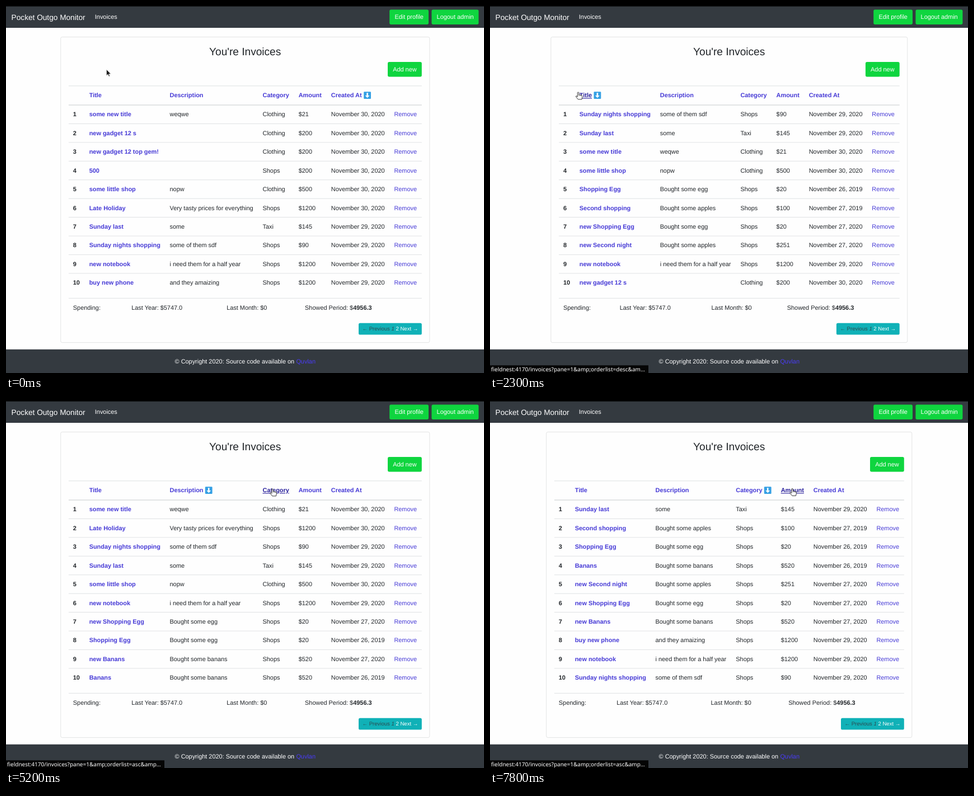
An HTML page that plays this animation: 854 by 656 pixels, repeating every 8000 ms.

```html
<!DOCTYPE html>
<html lang="en">
<head>
<meta charset="utf-8">
<title>Invoices</title>
<style>
  html, body { margin: 0; width: 100%; height: 100%; overflow: hidden; background: #fefefe; }
  svg { display: block; width: 854px; height: 656px; }
  text { font: 10.92px "Liberation Sans", Arial, sans-serif; fill: #212529; text-rendering: geometricPrecision; white-space: pre; }
  .b { font-weight: bold; }
  .link { fill: #463ad6; }
  .hover { fill: #29209c; text-decoration: underline; }
  .w { fill: #fff; }
  .brand { font-size: 13.66px; }
  .head { font-size: 19.1px; }
  .pager { font-size: 9.56px; }
  .bar { font: 10px "Noto Sans", "Open Sans", sans-serif; fill: #fff; }
</style>
</head>
<body>
<svg viewBox="0 0 854 656">
  <rect width="854" height="656" fill="#fefefe"/>
  <rect width="854" height="39" fill="#343a40"/>
  <rect width="854" height="1" fill="#0c0d0e"/>
  <rect y="613.8" width="854" height="43" fill="#343a40"/>
  <g id="fixed"></g>
  <g id="page"></g>
  <g id="status"></g>
  <g id="cursor"></g>
</svg>
<script>
const LOOP = 8000, TICK = 100, ROW = 33.44;
const el = id => document.getElementById(id);

// title | description | category | amount | date
const items = `some new title|weqwe|Clothing|21|30, 2020
new gadget 12 s||Clothing|200|30, 2020
new gadget 12 top gem!||Clothing|200|30, 2020
500||Shops|200|30, 2020
some little shop|nopw|Clothing|500|30, 2020
Late Holiday|Very tasty prices for everything|Shops|1200|30, 2020
Sunday last|some|Taxi|145|29, 2020
Sunday nights shopping|some of them sdf|Shops|90|29, 2020
new notebook|i need them for a half year|Shops|1200|29, 2020
buy new phone|and they amaizing|Shops|1200|29, 2020
Banans|Bought some banans|Shops|520|26, 2019
First shopping|Bought some apples|Shops|10|27, 2019
new Banans|Bought some banans|Shops|520|27, 2020
new Second night|Bought some apples|Shops|251|27, 2020
Shopping Egg|Bought some egg|Shops|20|26, 2019
Second shopping|Bought some apples|Shops|100|27, 2019
new Shopping Egg|Bought some egg|Shops|20|27, 2020`.split('\n').map(s => s.split('|'));

const heads = ['Title', 'Description', 'Category', 'Amount', 'Created At'];
const headWidth = [22.5, 60.1, 47.3, 41.2, 55.2];

// Sorted views: order spells out items by letter, a = first
const views = [
  { at: 0, left: 97.7, desc: 292.5, sort: 4, up: false, order: 'abcdefghij' },
  { at: 1400, left: 99.3, desc: 291, sort: 0, up: true, order: 'dkfjlmcbin' },
  { at: 2300, left: 108.8, desc: 303.8, sort: 0, up: false, order: 'hgaeopqnib' },
  { at: 3900, left: 121.8, desc: 313.5, sort: 1, up: true, order: 'dbcjlpnkmo' },
  { at: 4100, left: 97.7, desc: 292.5, sort: 1, up: false, order: 'afhgeiqomk' },
  { at: 5900, left: 112.3, desc: 307, sort: 2, up: true, order: 'eacbnqmjlh' },
  { at: 6900, left: 100.7, desc: 295.5, sort: 2, up: false, order: 'gpoknqmjih' }
];

const hovers = [
  { at: 0, col: -1 }, { at: 600, col: 0 }, { at: 2700, col: -1 }, { at: 3000, col: 1 },
  { at: 4600, col: -1 }, { at: 5100, col: 2 }, { at: 5900, col: -1 }, { at: 6400, col: 2 },
  { at: 7400, col: -1 }, { at: 7600, col: 3 }
];

const host = 'fieldnest:4170/';
const descUrl = host + 'invoices?pane=1&amp;orderlist=desc&am…';
const ascUrl = host + 'invoices?pane=1&amp;orderlist=asc&amp…';
const bars = [
  { at: 0, text: '' },
  { at: 700, text: host + '?orderlist=asc&pane=1&rank=title', width: 236 },
  { at: 2100, text: descUrl }, { at: 2800, text: '' }, { at: 3100, text: ascUrl },
  { at: 4100, text: descUrl }, { at: 5100, text: ascUrl },
  { at: 6400, text: descUrl }, { at: 7000, text: ascUrl }
];

// Pointer path: time, x, y
const path = [
  [100, 179.5, 113.5], [800, 158, 155], [900, 158, 155], [1000, 157.5, 154.5],
  [2500, 157.5, 154.5], [3100, 347, 152], [3300, 347, 152], [3400, 340, 158.5],
  [4400, 340, 158.5], [5200, 476, 157.5], [6000, 476, 157.5], [6200, 482, 159],
  [6500, 464, 158], [7100, 464, 158], [7800, 540, 157]
];

const current = (list, t) => list.filter(s => s.at <= t).pop();
const safe = s => s.replace(/&/g, '&amp;');
const text = (x, y, s, cls = '') => `<text x="${x}" y="${y}" class="${cls}">${safe(s)}</text>`;
const box = (x, y, w, h, fill) => `<rect x="${x}" y="${y}" width="${w}" height="${h}" rx="2.7" fill="${fill}"/>`;
const button = (x, y, w, s) => box(x, y, w, 26.4, '#0fd53f') + text(x + 9.2, y + 16.9, s, 'w');

function rule(x1, x2, y, w = 0.8) {
  return `<path d="M${x1} ${y}H${x2}" stroke="#d9dbdd" stroke-width="${w}"/>`;
}

function sortIcon(x, up) {
  const turn = up ? '' : ' rotate(180)';
  return `<g transform="translate(${x + 6.5} 159.6)${turn}">
    <rect x="-6.4" y="-6.4" width="12.8" height="12.8" rx="1.2" fill="#35a0e4"/>
    <path d="M0 -4.6L4 -.4H1.3V4.4H-1.3V-.4H-4Z" fill="#fff"/></g>`;
}

function drawFixed() {
  return text(9.6, 24.7, 'Pocket Outgo Monitor', 'w brand') +
    text(158.8, 23.4, 'Invoices', 'w') +
    button(685.2, 6.5, 69.8, 'Edit profile') +
    button(760.4, 6.5, 84, 'Logout admin') +
    text(301.6, 639.2, '© Copyright 2020: Source code available on', 'w') +
    '<text x="518.4" y="639.2" style="fill:#4a3cf6">Quvlan</text>';
}

function drawPage(v, hover) {
  const left = v.left, right = 854.5 - left, d = left - views[0].left;
  const removeX = right - 63.4, madeX = removeX - 112.6, amountX = madeX - 58.1;
  const catX = amountX - (v.sort === 2 ? 80.4 : 64.2);
  const cols = [left + 51, v.desc, catX, amountX, madeX];
  const x1 = left + 14.2, x2 = right - 14, numX = left + 22.1;

  let out = `<rect x="${left}" y="55.4" width="${right - left}" height="546.2" rx="2.7" fill="#fefefe" stroke="#dcddde" stroke-width=".8"/>`;
  out += '<text x="427.2" y="87.5" class="head" text-anchor="middle">You\'re Invoices</text>';
  out += button(x2 - 60.8, 100, 60.8, 'Add new');
  out += rule(x1, x2, 142.8) + rule(x1, x2, 177, 1.4);

  heads.forEach((h, i) => out += text(cols[i], 163.4, h, 'b link' + (i === hover ? ' hover' : '')));
  out += sortIcon(cols[v.sort] + headWidth[v.sort] + 3.1, v.up);

  [...v.order].forEach((c, i) => {
    const [title, desc, cat, amount, date] = items[c.charCodeAt(0) - 97];
    const y = 197.4 + ROW * i;
    if (i) out += rule(x1, x2, 177 + ROW * i);
    out += text(numX, y, String(i + 1), 'b') + text(cols[0], y, title, 'b link') +
      text(cols[1], y, desc) + text(catX, y, cat) + text(amountX, y, '$' + amount) +
      text(madeX, y, 'November ' + date) + text(removeX, y, 'Remove', 'link');
  });

  out += rule(x1, x2, 522.4);
  out += text(numX, 542.8, 'Spending:') +
    text(224.2 + 0.68 * d, 542.8, 'Last Year: $5747.0') +
    text(394.2 + 0.12 * d, 542.8, 'Last Month: $0') +
    `<text x="${534.1 - 0.3 * d}" y="542.8">Showed Period: $<tspan class="b">4956.3</tspan></text>`;

  out += box(x2 - 112.8, 566.7, 112.8, 20.9, '#10b1b7');
  out += `<text x="${x2 - 106.3}" y="580.3" class="pager" style="fill:#2d4a50">← Previous <tspan font-style="italic">1</tspan><tspan class="w"> 2 Next →</tspan></text>`;
  return out;
}

function drawBar(b) {
  if (!b.text) return '';
  return `<rect y="642.3" width="${b.width || 283}" height="14" fill="#050505"/>` + text(2, 653, b.text, 'bar');
}

function pointerAt(t) {
  const i = path.findIndex(p => p[0] > t);
  if (i === 0) return path[0].slice(1);
  if (i < 0) return path[path.length - 1].slice(1);
  const [t0, x0, y0] = path[i - 1], [t1, x1, y1] = path[i];
  const u = (t - t0) / (t1 - t0), e = u * u * (3 - 2 * u);
  return [x0 + (x1 - x0) * e, y0 + (y1 - y0) * e];
}

function drawPointer(t, hand) {
  const [x, y] = pointerAt(t);
  const shape = hand
    ? '<path d="M-1.2 .8a1.2 1.2 0 0 1 2.4 0V4L6 5Q7.6 5.4 7.4 7.5L6.5 12.4H-.2L-4 7.6Q-4.4 6 -2.6 6.4L-1.2 7.8Z" fill="#fff" stroke="#222" stroke-width=".9" stroke-linejoin="round"/><path d="M1.2 4V6.6M3.4 4.6V6.6M5.5 5V6.8" stroke="#444" stroke-width=".6"/>'
    : '<path d="M0 0V11L2.6 8.6L4.3 12.5L6 11.7L4.4 8H7.8Z" fill="#1c1c1c" stroke="#eee" stroke-width=".7"/>';
  return `<g transform="translate(${x} ${y})">${shape}</g>`;
}

let shown = -1;
function render(ms) {
  const t = Math.floor((ms % LOOP) / TICK) * TICK;
  if (t !== shown) {
    shown = t;
    const hover = current(hovers, t).col;
    el('page').innerHTML = drawPage(current(views, t), hover);
    el('status').innerHTML = drawBar(current(bars, t));
    el('cursor').innerHTML = drawPointer(t, hover >= 0);
  }
}

el('fixed').innerHTML = drawFixed();
const start = performance.now();
function loop() {
  render(performance.now() - start);
  requestAnimationFrame(loop);
}
loop();
</script>
</body>
</html>
```
